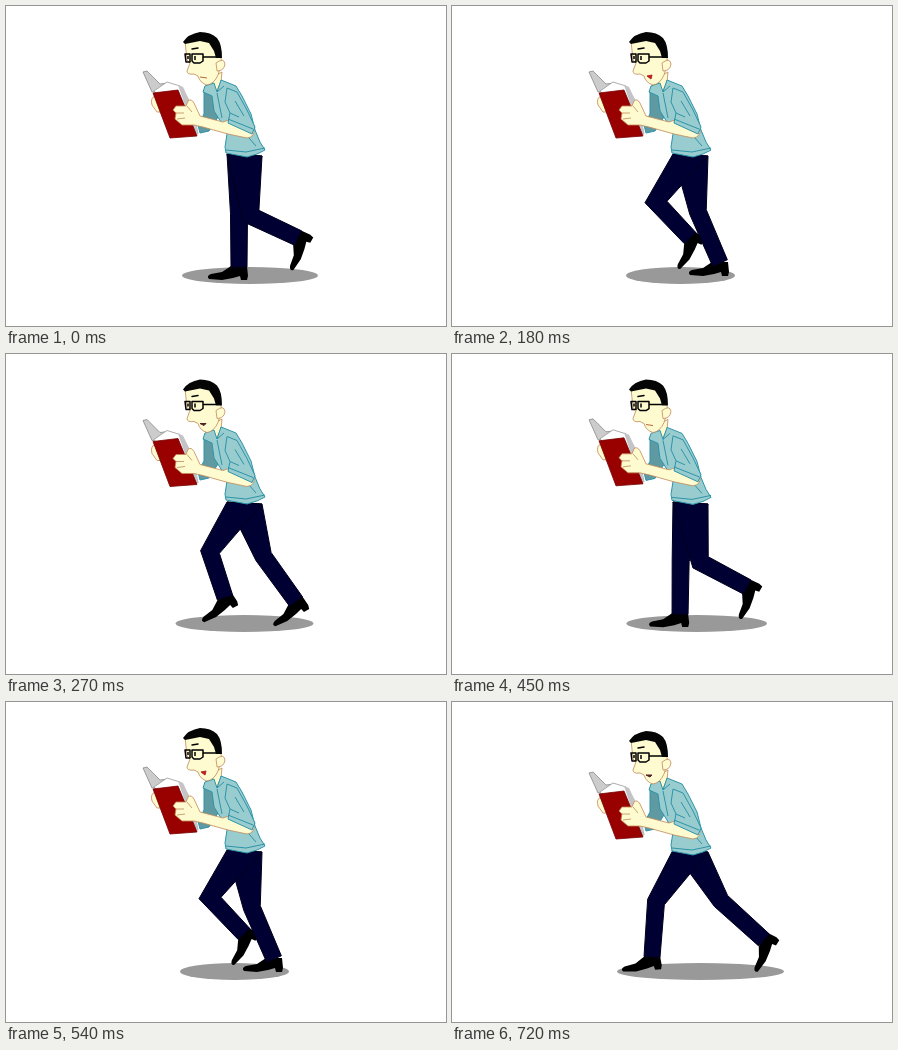
An HTML page for the animation above (0.81 s loop, 440x320 px).

```html
<!DOCTYPE html>
<html lang="en">
<head>
<meta charset="utf-8">
<title>Walking reader</title>
<style>
  html, body { margin: 0; width: 100%; height: 100%; overflow: hidden; background: #fff; }
  svg { display: block; width: 440px; height: 320px; }
  path { stroke-linejoin: round; }
  .trousers { fill: #000033; stroke: #00001c; }
  .shirt { fill: #99cccf; stroke: #2d94a9; }
  .fold { fill: none; stroke: #2d94a9; }
  .skin { fill: #fffbd0; stroke: #c08a58; stroke-width: .8; }
  .crease { fill: none; stroke: #c08a58; stroke-width: .8; }
  .ink { fill: none; stroke: #000; stroke-width: 1.5; }
</style>
</head>
<body>
<svg viewBox="0 0 440 320">
  <defs>
    <path id="shoe" d="M8 13L9 9L8 -1H-8L-17 5L-28 7Q-33 9-30 12L-17 13L-6 11L1 9L2 13Z"/>
  </defs>
  <ellipse id="shadow" cy="269.5" ry="8.5" fill="#999"/>
  <use id="stanceShoe" href="#shoe"/>
  <use id="swingShoe" href="#shoe"/>
  <path id="stanceLeg" class="trousers"/>
  <path id="swingLeg" class="trousers"/>

  <g id="torso">
    <path d="M198 86L207 83L212 111L203 125L194 127L192 119L198 108Z" fill="#5f9aa3" stroke="#2d94a9"/>
    <path class="skin" d="M205 72L216 66L215 76L209 88L204 80Z"/>
    <path class="shirt" d="M197 86L199 80L208 77L211 86L215 74L230 80L236 90L245 108L249 124L254 136L259 144L251 148L241 151L220 147L219 141L221 128L215 116L208 105L206 90Z"/>
    <path class="fold" d="M211 86L218 80M211 87L216 112M220 144L240 146L259 142M243 132L250 140"/>
  </g>

  <g id="head">
    <path class="skin" d="M179 35L181 54L184 57L181 65Q181 69 188 68L192 70Q194 77 201 79Q208 78 212 69L216 56L209 33Z"/>
    <path class="skin" d="M210 57Q218 51 219 58Q218 65 211 65Z"/>
    <path d="M177 36Q182 28 194 26Q205 26 211 32Q216 38 216 52L210 52L208 45L203 37L194 35L179 38Z" fill="#050505"/>
    <path class="ink" d="M179 48H184V56H180ZM186 48H197V55L194 57H188L186 55ZM197 51H210M189 50V54M182 50V53"/>
    <path class="ink" stroke-linecap="round" d="M186 43L192 42"/>
    <path id="mouth"/>
  </g>

  <g id="arms">
    <path d="M137 66L141 65L154 78L162 77L158 85L146 86Z" fill="#ccc" stroke="#888" stroke-width=".8"/>
    <path class="skin" d="M155 90L149 90Q144 92 146 99L151 106L158 106Z"/>
    <path d="M148 85L161 76L174 80L186 99L192 128L186 128Z" fill="#fff" stroke="#999" stroke-width=".8"/>
    <path d="M172 79L177 81L188 104L192 128L188 126Z" fill="#c4c4c8"/>
    <path d="M147 87L172 84L191 130L164 132Z" fill="#900" stroke="#700" stroke-width=".8"/>
    <path class="skin" d="M194 110L217 116L226 113L248 123Q249 131 241 132L222 128L197 121L188 119L176 119L169 113L170 107L167 104L170 100L180 100L182 95Q185 92 188 97Z"/>
    <path class="crease" d="M170 107H178M171 113L179 112M181 100L186 106"/>
    <path class="shirt" d="M221 82L231 86L241 104L249 121L246 128L222 117L224 107L219 96Z"/>
    <path class="fold" d="M222 113L247 123M224 107L233 111M229 95L238 110"/>
  </g>
</svg>
<script>
const FRAME_MS = 90;
const WAIST = { front: [221, 148], back: [256, 150] };
const KNEE_HALF = 8.5, CUFF_HALF = 8;

// Legs: knee x, y, ankle x, y, foot angle. Lift: torso, head, arms.
const poses = [
  { stance: [233, 208, 233, 261, 0], swing: [245, 210, 292, 232, -60],
    lift: [0, 0, 0], shadow: [176, 312], mouth: "M194 71L201 72", lips: "#b96a3c" },
  { stance: [246, 206, 268, 257, 0], swing: [204, 196, 238, 232, -51],
    lift: [0, 0, 0], shadow: [174, 283], mouth: "M195 70L200 69L199 73Z", lips: "#b22" },
  { stance: [269, 199, 312, 238, -57], swing: [204, 200, 200, 255, -5],
    lift: [2, 3, 5], shadow: [165, 332], mouth: "M194 70L200 70L198 72Z", lips: "#522" }
];
// Position in the pose cycle for each drawing of the two steps.
const phases = [0, .5, 1, 1.5, 2, 2.85, 4, 4.5, 5];

const set = (id, attributes) => {
  for (const name in attributes) document.getElementById(id).setAttribute(name, attributes[name]);
};

function normal(x1, y1, x2, y2) {
  const length = Math.hypot(x2 - x1, y2 - y1);
  return [(y1 - y2) / length, (x2 - x1) / length];
}

// Tapered limb from the waist through a mitred knee to the cuff.
function legPath([kx, ky, ax, ay]) {
  const thigh = normal(238, 149, kx, ky), shin = normal(kx, ky, ax, ay);
  const miter = KNEE_HALF / (1 + thigh[0] * shin[0] + thigh[1] * shin[1]);
  const bend = thigh.map((v, i) => (v + shin[i]) * miter);
  const cuff = shin.map(v => v * CUFF_HALF);
  return "M" + [
    WAIST.front, [kx + bend[0], ky + bend[1]], [ax + cuff[0], ay + cuff[1]],
    [ax - cuff[0], ay - cuff[1]], [kx - bend[0], ky - bend[1]], WAIST.back
  ].join("L") + "Z";
}

function draw(phase) {
  const index = Math.floor(phase) % 3, amount = phase % 1;
  const from = poses[index], to = poses[(index + 1) % 3];
  const mix = (a, b) => a.map((v, i) => v + (b[i] - v) * amount);

  // After contact the leading leg becomes the stance leg.
  const swapped = index === 2 && amount > 0;
  const [first, second] = swapped ? ["swing", "stance"] : ["stance", "swing"];
  const legs = { stance: mix(from[first], to.stance), swing: mix(from[second], to.swing) };
  for (const side in legs) {
    const [, , x, y, angle] = legs[side];
    set(side + "Leg", { d: legPath(legs[side]) });
    set(side + "Shoe", { transform: `translate(${x} ${y}) rotate(${angle})` });
  }

  const rise = 2 * Math.sin(Math.PI * amount);
  const lift = mix(from.lift, to.lift);
  ["torso", "head", "arms"].forEach((id, i) =>
    set(id, { transform: `translate(0 ${lift[i] - rise})` }));

  const [left, right] = mix(from.shadow, to.shadow);
  set("shadow", { cx: (left + right) / 2, rx: (right - left) / 2 });
  const { mouth, lips } = poses[Math.round(phase) % 3];
  set("mouth", { d: mouth, fill: lips, stroke: lips });
}

function tick() {
  draw(phases[Math.floor(performance.now() / FRAME_MS) % phases.length]);
  requestAnimationFrame(tick);
}
tick();
</script>
</body>
</html>
```
